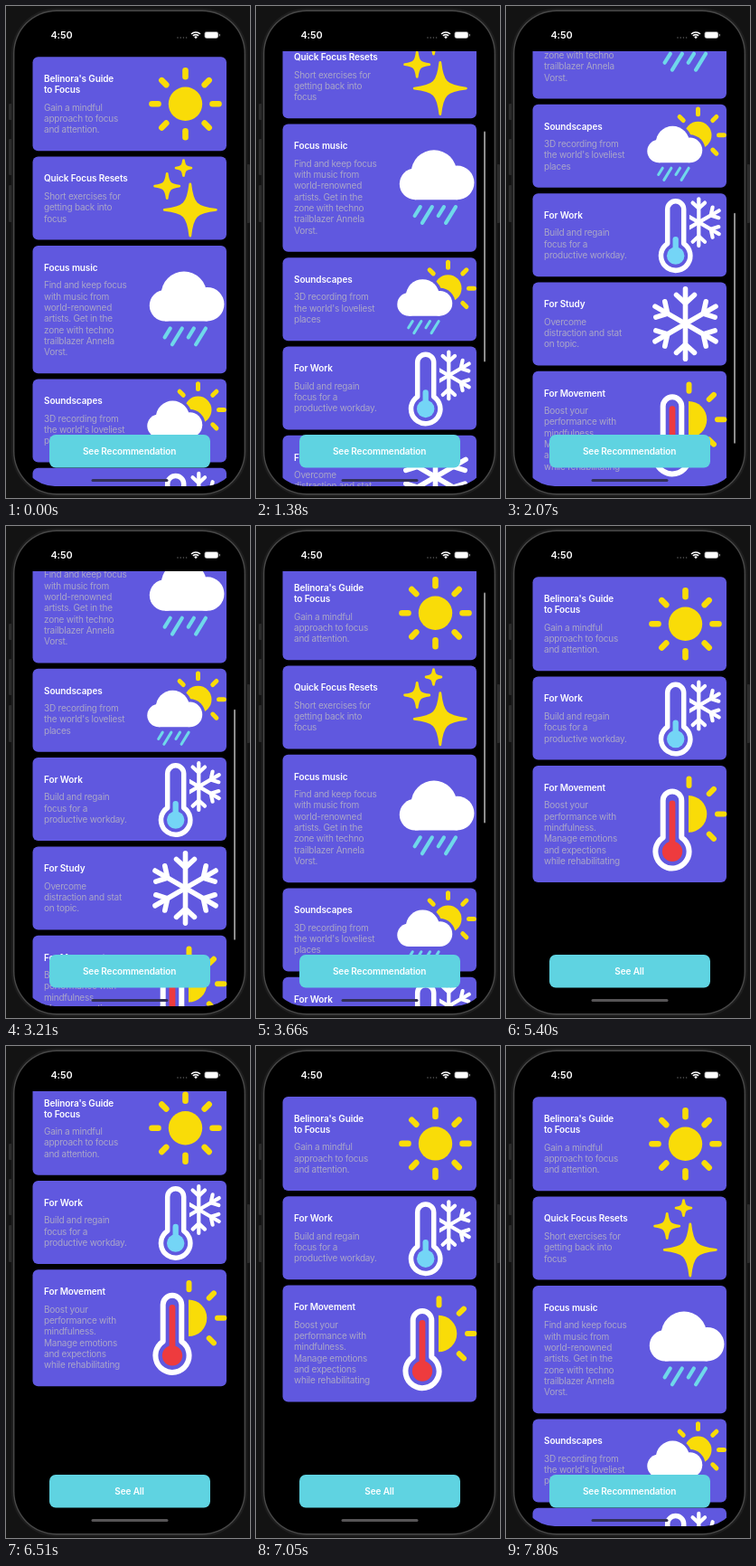
An HTML page with a canvas for the animation above (9030 ms loop, 270x544 px).

```html
<!DOCTYPE html>
<html lang="en">
<head>
<meta charset="utf-8">
<title>Focus cards</title>
<style>
  html, body { margin: 0; width: 100%; height: 100%; overflow: hidden; background: #131313; }
  canvas { display: block; width: 100%; height: 100%; }
</style>
</head>
<body>
<canvas id="stage"></canvas>
<script>
const W = 270, H = 544, LOOP = 9030;
const INDIGO = '#6058df', YELLOW = '#f9dc08', CYAN = '#5fd3e1', RAIN = '#6fd8ea',
      ICE = '#74d5f6', RED = '#ee3b3e', WHITE = '#fff', MUTED = '#aaa6c8';
const LINE = 12.33, GAP = 6.3, TOP = 56.3, MAX_SCROLL = 312;

const canvas = document.getElementById('stage');
const ctx = canvas.getContext('2d');
const dpr = Math.max(1, window.devicePixelRatio || 1);
canvas.width = W * dpr;
canvas.height = H * dpr;

// easing
const clamp = v => Math.min(1, Math.max(0, v));
const span = (t, a, b) => clamp((t - a) / (b - a));
const mix = (a, b, p) => a + (b - a) * p;
const easeInOut = u => (1 - Math.cos(Math.PI * u)) / 2;

// drawing helpers
function disc(x, y, r, color) {
  ctx.fillStyle = color;
  ctx.beginPath();
  ctx.arc(x, y, r, 0, Math.PI * 2);
  ctx.fill();
}

function box(x, y, w, h, r, color) {
  ctx.fillStyle = color;
  ctx.beginPath();
  ctx.roundRect(x, y, w, h, r);
  ctx.fill();
}

function pen(color, width) {
  ctx.strokeStyle = color;
  ctx.lineWidth = width;
  ctx.lineCap = ctx.lineJoin = 'round';
}

function line(x1, y1, x2, y2) {
  ctx.beginPath();
  ctx.moveTo(x1, y1);
  ctx.lineTo(x2, y2);
  ctx.stroke();
}

function text(str, x, y, color, weight = 400, size = 10, spacing = -0.23) {
  ctx.font = `${weight} ${size}px Inter, sans-serif`;
  ctx.letterSpacing = spacing + 'px';
  ctx.fillStyle = color;
  ctx.fillText(str, x, y);
}

const heading = (str, x, y) => text(str, x, y, WHITE, 600, 10, -0.12);

// icon parts
function rays(x, y, r1, r2, width, eighths) {
  pen(YELLOW, width);
  for (const i of eighths) {
    const a = i * Math.PI / 4, c = Math.cos(a), s = Math.sin(a);
    line(x + c * r1, y + s * r1, x + c * r2, y + s * r2);
  }
}

function sparkle(x, y, r) {
  const tip = r - 1.4, near = r * 0.08, far = r * 0.22;
  ctx.save();
  ctx.translate(x, y);
  ctx.beginPath();
  ctx.moveTo(0, -tip);
  for (let i = 0; i < 4; i++) {
    ctx.bezierCurveTo(near, -far, far, -near, tip, 0);
    ctx.rotate(Math.PI / 2);
  }
  ctx.closePath();
  ctx.fillStyle = YELLOW;
  pen(YELLOW, 2.8);
  ctx.fill();
  ctx.stroke();
  ctx.restore();
}

function cloudShape(grow, color) {
  disc(17.5, 38, 17.5 + grow, color);
  disc(38.5, 25.5, 25.5 + grow, color);
  disc(64.5, 36.5, 19 + grow, color);
  box(17.5, 30, 47, 25.5 + grow, 0, color);
}

function rainCloud(x, y, scale, halo) {
  ctx.save();
  ctx.translate(x, y);
  ctx.scale(scale, scale);
  if (halo) cloudShape(halo, INDIGO);
  cloudShape(0, WHITE);
  pen(RAIN, 4.2);
  for (let i = 0; i < 4; i++) {
    const sx = 23.2 + i * 13.2, long = i % 2;
    line(sx, 63.5, sx - (long ? 11 : 6.2), long ? 81.5 : 73.5);
  }
  ctx.restore();
}

function snowflake(x, y, r, width) {
  pen(WHITE, width);
  const tip = r - width / 2;
  for (let i = 0; i < 6; i++) {
    ctx.save();
    ctx.translate(x, y);
    ctx.rotate(i * Math.PI / 3);
    line(0, 0, 0, -tip);
    ctx.beginPath();
    ctx.moveTo(-r * 0.24, -r * 0.77);
    ctx.lineTo(0, -r * 0.55);
    ctx.lineTo(r * 0.24, -r * 0.77);
    ctx.stroke();
    ctx.restore();
  }
}

function thermometer(x, top, bulbY, tube, bulb, width, stemTop, color) {
  const a = Math.asin(tube / bulb), up = -Math.PI / 2;
  ctx.beginPath();
  ctx.arc(x, top + tube, tube, Math.PI, 0);
  ctx.arc(x, bulbY, bulb, up + a, up - a + Math.PI * 2);
  ctx.closePath();
  pen(INDIGO, width + 7);
  ctx.stroke();
  ctx.fillStyle = INDIGO;
  ctx.fill();
  pen(WHITE, width);
  ctx.stroke();
  pen(color, width + 0.8);
  line(x, stemTop, x, bulbY);
  disc(x, bulbY, bulb * 0.6, color);
}

// icons, y measured from the card's top
const ALL = [0, 1, 2, 3, 4, 5, 6, 7];

function sun() {
  disc(198.5, 52, 18.7, YELLOW);
  rays(198.5, 52, 30, 37, 6.6, ALL);
}

function sparkles() {
  sparkle(203.8, 58.8, 30);
  sparkle(178.2, 32.5, 15);
  sparkle(196.5, 12.5, 9.8);
}

function sunRain() {
  disc(212.5, 34, 15, YELLOW);
  rays(212.5, 34, 23, 28.8, 5, [0, 1, 5, 6, 7]);
  rainCloud(156.3, 24, 0.73, 4.5);
}

function coldThermometer() {
  snowflake(213.3, 32, 28, 4.2);
  thermometer(187.7, 8.7, 69, 9, 16.2, 5.5, 51, ICE);
}

function warmThermometer() {
  ctx.fillStyle = YELLOW;
  ctx.beginPath();
  ctx.arc(202, 53.5, 20.3, -Math.PI / 2, Math.PI / 2);
  ctx.fill();
  rays(202.5, 53.5, 31.5, 38.8, 6, [0, 1, 6, 7]);
  thermometer(184, 28.5, 95, 10.3, 18.6, 6, 42, RED);
}

// cards
const cards = [
  { title: ["Belinora's Guide", 'to Focus'], keep: true, icon: sun,
    body: ['Gain a mindful', 'approach to focus', 'and attention.'] },
  { title: ['Quick Focus Resets'], icon: sparkles,
    body: ['Short exercises for', 'getting back into', 'focus'] },
  { title: ['Focus music'], icon: () => rainCloud(158.8, 28.7, 0.99, 0),
    body: ['Find and keep focus', 'with music from', 'world-renowned', 'artists. Get in the',
           'zone with techno', 'trailblazer Annela', 'Vorst.'] },
  { title: ['Soundscapes'], icon: sunRain,
    body: ['3D recording from', "the world's loveliest", 'places'] },
  { title: ['For Work'], keep: true, icon: coldThermometer,
    body: ['Build and regain', 'focus for a', 'productive workday.'] },
  { title: ['For Study'], icon: () => snowflake(198.5, 46, 41.5, 5.6),
    body: ['Overcome', 'distraction and stat', 'on topic.'] },
  { title: ['For Movement'], keep: true, icon: warmThermometer,
    body: ['Boost your', 'performance with', 'mindfulness.', 'Manage emotions',
           'and expections', 'while rehabilitating'] }
];

let fullY = TOP, shortY = TOP;
for (const card of cards) {
  card.h = 92 + LINE * (card.body.length - 3) + 12 * (card.title.length - 1);
  card.fullY = fullY;
  card.shortY = card.keep ? shortY : fullY;
  fullY += card.h + GAP;
  if (card.keep) shortY += card.h + GAP;
}

function drawCard(card, y) {
  ctx.save();
  ctx.translate(0, y);
  box(29.5, 0, 214.5, card.h, 6, INDIGO);
  card.icon();
  card.title.forEach((s, i) => heading(s, 42, 27.8 + i * 12));
  const first = 47.3 + 12 * (card.title.length - 1);
  card.body.forEach((s, i) => text(s, 42, first + i * LINE, MUTED));
  ctx.restore();
}

// motion
// A drag up to a speed, free deceleration, then a damped bounce at the limit.
function flick(ms, speed, limit) {
  const s = Math.max(0, ms / 1000), drag = 0.16, pulled = speed * drag / 2;
  if (s < drag) return speed * s * s / (2 * drag);
  const hit = drag - Math.log(1 - 2 * (limit - pulled) / speed) / 2;
  if (s < hit) return pulled + speed / 2 * (1 - Math.exp(-2 * (s - drag)));
  const after = s - hit;
  return limit + speed * Math.exp(-2 * (hit - drag)) * after * Math.exp(-12 * after);
}

function scrollAt(t) {
  const first = 70;
  if (t < 1170) return first * easeInOut(span(t, 780, 1000));
  if (t < 3060) return first + flick(t - 1170, 501, MAX_SCROLL - first);
  if (t < 4400) return MAX_SCROLL - flick(t - 3060, 804, MAX_SCROLL);
  const back = 14 * Math.max(0, t - 6600) / 1000;
  return 30 * easeInOut(span(t, 6400, 6600)) * (1 + back) * Math.exp(-back);
}

const filterAt = t => t < 7000
  ? easeInOut(span(t, 4980, 5380))
  : 1 - easeInOut(span(t, 7390, 7780));

const press = (t, down, up) => span(t, down - 30, down + 30) * (1 - span(t, up, up + 250));
const pressAt = t => press(t, 4740, 4950) + press(t, 7290, 7380);

// scene
function drawPhone() {
  ctx.fillStyle = '#131313';
  ctx.fillRect(0, 0, W, H);
  for (const [x, y, h] of [[3, 108, 18], [3, 147, 40], [3, 198, 41], [266.5, 175, 65]]) {
    box(x, y, 3.5, h, 1.2, '#2b2b2b');
  }
  box(6, 2.5, 261, 540, 50, '#1e1e1e');
  box(8, 4.5, 257, 536, 48, '#484848');
  box(9.4, 5.9, 254.2, 533.2, 46.6, '#000');
}

function drawStatus() {
  text('4:50', 49.5, 36, WHITE, 600, 10.8, -0.1);
  for (let i = 0; i < 4; i++) disc(190 + i * 3.2, 35, 0.8, '#5c5c5c');
  pen(WHITE, 1.6);
  ctx.lineCap = 'butt';
  for (const r of [4.4, 7]) {
    ctx.beginPath();
    ctx.arc(210, 36, r, -Math.PI * 0.75, -Math.PI * 0.25);
    ctx.stroke();
  }
  ctx.fillStyle = WHITE;
  ctx.beginPath();
  ctx.moveTo(210, 36.2);
  ctx.arc(210, 36, 2.6, -Math.PI * 0.75, -Math.PI * 0.25);
  ctx.fill();
  box(219.5, 28.2, 15.6, 7.8, 2.4, '#8b8b8b');
  box(220.3, 29, 14, 6.2, 1.7, WHITE);
  box(235.8, 30.8, 1.2, 2.6, 0.6, '#8b8b8b');
}

function drawCards(scroll, filter) {
  ctx.save();
  ctx.beginPath();
  ctx.roundRect(16, 10, 241.5, 521, 38);
  ctx.clip();
  ctx.beginPath();
  ctx.rect(0, 50, W, H);
  ctx.clip();
  for (const keep of [false, true]) {
    for (const card of cards) {
      if (!!card.keep !== keep) continue;
      const alpha = keep ? 1 : 1 - filter;
      const y = mix(card.fullY, card.shortY, filter) - scroll;
      if (alpha <= 0 || y > H || y + card.h < 50) continue;
      ctx.globalAlpha = alpha;
      drawCard(card, y);
    }
  }
  ctx.restore();
}

function drawScrollbar(t, scroll) {
  const alpha = span(t, 770, 810) * (1 - span(t, 4740, 4980));
  if (!alpha) return;
  const over = Math.max(0, -scroll, scroll - MAX_SCROLL);
  ctx.globalAlpha = alpha;
  box(252, 67 + 0.533 * Math.max(0, scroll), 2, 255 - over, 1, '#8c8c8c');
  ctx.globalAlpha = 1;
}

function drawButton(filter, dim) {
  const base = 1 - 0.5 * dim;
  ctx.globalAlpha = base;
  box(48, 474, 178, 36.5, 7, CYAN);
  ctx.textAlign = 'center';
  ctx.globalAlpha = base * (1 - filter);
  heading('See Recommendation', 136.6, 495.8);
  ctx.globalAlpha = base * filter;
  heading('See All', 136.6, 495.8);
  ctx.textAlign = 'left';
  ctx.globalAlpha = 1;
}

function draw(t) {
  const scroll = scrollAt(t), filter = filterAt(t);
  ctx.setTransform(dpr, 0, 0, dpr, 0, 0);
  drawPhone();
  drawCards(scroll, filter);
  drawStatus();
  drawScrollbar(t, scroll);
  drawButton(filter, pressAt(t));
  const c = mix(50, 86, filter);
  box(94.5, 523, 85, 3, 1.5, `rgb(${c}, ${c - 2}, ${mix(88, 86, filter)})`);
}

const start = performance.now();
function tick() {
  draw((performance.now() - start) % LOOP);
  requestAnimationFrame(tick);
}
tick();
</script>
</body>
</html>
```
